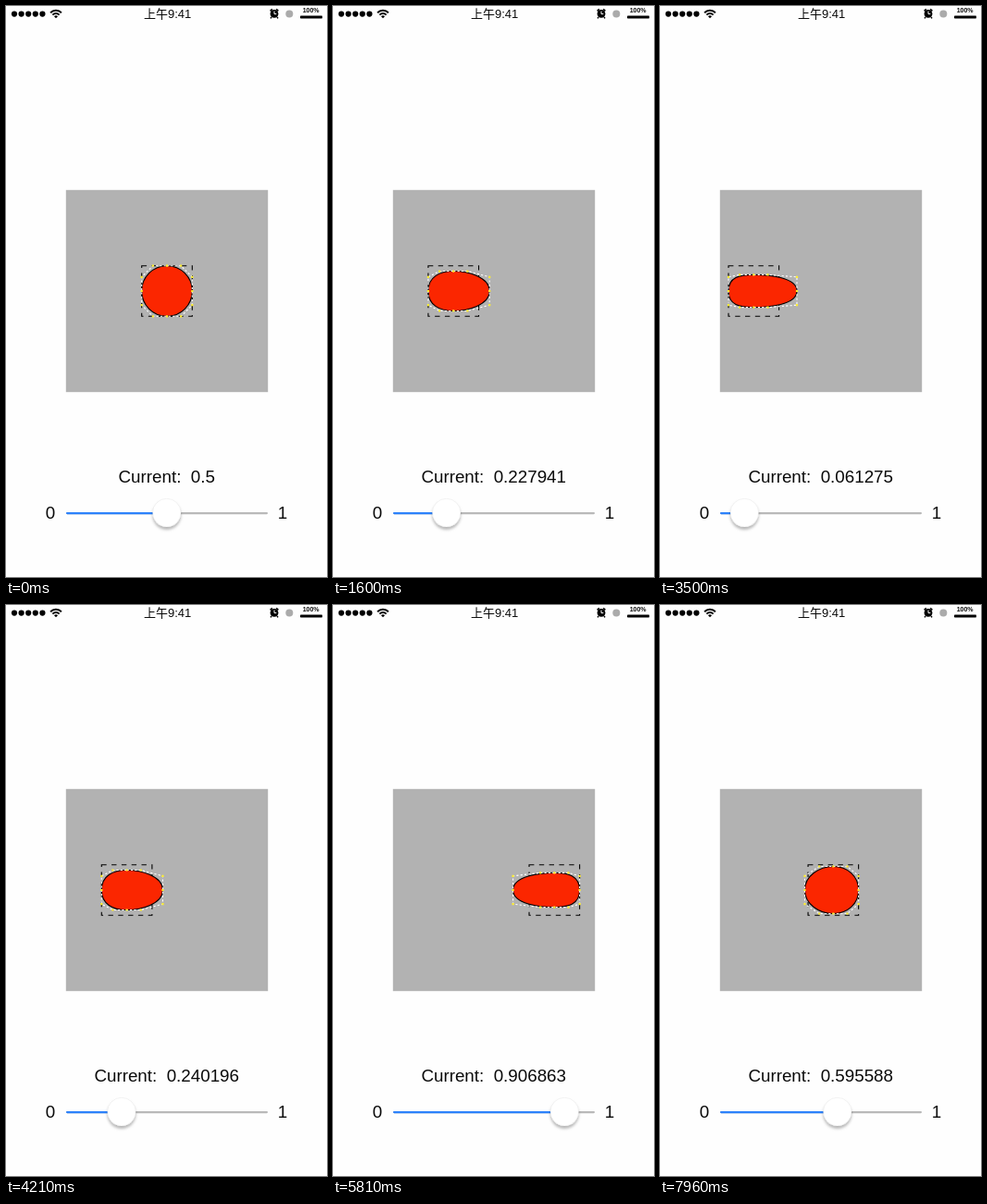
Recreate the animation shown at these times as an HTML page. Size 347 px wide and 617 px high, loop 8000 ms.

```html
<!DOCTYPE html>
<html lang="zh">
<head>
<meta charset="utf-8">
<title>Slider and elastic circle</title>
<style>
  html, body { margin: 0; width: 100%; height: 100%; overflow: hidden; background: #fefefe; }
  svg { display: block; width: 100vw; height: 100vh; }
  text { text-anchor: middle; white-space: pre; fill: #0a0a0a; }
  .label { font: 18.8px "Liberation Sans", Arial, sans-serif; }
  .clock { font: 500 13px "Liberation Sans", "Noto Sans CJK SC", "Noto Sans CJK", sans-serif; }
  .percent { font: bold 7px "Liberation Sans", Arial, sans-serif; }
</style>
</head>
<body>
<svg viewBox="0 0 347 617" xmlns="http://www.w3.org/2000/svg">
  <defs>
    <clipPath id="panel"><rect x="64.8" y="198.8" width="218.4" height="218.4"/></clipPath>
    <filter id="shadow" x="-50%" y="-50%" width="200%" height="200%">
      <feDropShadow dx="0" dy="2.8" stdDeviation="1.8" flood-color="#000" flood-opacity=".28"/>
    </filter>
  </defs>
  <rect width="347" height="617" fill="#fefefe"/>

  <g id="signal"></g>
  <g fill="none" stroke="#000" stroke-width="1.9">
    <path d="M48.1 7.2a8.4 8.4 0 0 1 11.8 0"/>
    <path d="M50.4 9.6a5 5 0 0 1 7.2 0"/>
  </g>
  <path d="M52 11.2a2.8 2.8 0 0 1 4 0l-2 2.1z"/>
  <text class="clock" x="174.6" y="13.2">上午9:41</text>
  <circle cx="290" cy="8.4" r="4.4"/>
  <path d="M285.6 5.4l2.2-2M294.4 5.4l-2.2-2M287 12l-1 1.4M293 12l1 1.4" stroke="#000" stroke-width="1.5"/>
  <path d="M290 5.6v3h2.4" fill="none" stroke="#fff" stroke-width="1"/>
  <circle cx="306.3" cy="8.6" r="4" fill="#ababab"/>
  <text class="percent" x="329.6" y="7.4">100%</text>
  <rect x="318" y="10.4" width="24" height="3.2" rx=".8"/>

  <rect x="64.8" y="198.8" width="218.4" height="218.4" fill="#b2b2b2"/>
  <g clip-path="url(#panel)">
    <path id="box" fill="none" stroke="#000" stroke-width="1.1" stroke-dasharray="5.4 5.4"/>
    <path id="blob" fill="#fb2600" stroke="#000" stroke-width="1.1"/>
    <path id="hull" fill="none" stroke="#fff" stroke-width="1.1" stroke-dasharray="2.17 2.17"/>
    <path id="dots" fill="#ffee30"/>
  </g>

  <text class="label" id="value" x="173.7" y="515.4"></text>
  <text class="label" x="48" y="554.4">0</text>
  <text class="label" x="299" y="554.4">1</text>
  <rect x="65" y="547" width="218" height="2.2" rx="1.1" fill="#b9b9b9"/>
  <rect id="fill" x="65" y="547" height="2.2" rx="1.1" fill="#2d82fb"/>
  <circle id="thumb" cy="547.6" r="15.3" fill="#fff" stroke="#000" stroke-opacity=".1" stroke-width=".5" filter="url(#shadow)"/>
</svg>
<script>
const LOOP = 8000, STEP = 90, LAG = 18;
const SIZE = 54.6, LEFT = 64.8, MID = 308, TRAVEL = 163.8;
const $ = id => document.getElementById(id);

// Drag position over time: [ms, value]
const keys = [
  [0, .5], [410, .5], [1600, .227941], [2130, .065], [2460, 0],
  [3050, 0], [3850, .15], [4210, .240196], [4740, .425], [5550, .735],
  [5810, .906863], [6130, 1], [6440, 1], [7150, .639706], [7240, .602],
  [7600, .465], [7870, .53], [7960, .595588]
];
const slopes = keys.slice(1).map((k, i) => (k[1] - keys[i][1]) / (k[0] - keys[i][0]));
const tangents = keys.map((k, i) => {
  if (i === 0) return slopes[0];
  if (i === slopes.length) return slopes[i - 1];
  const a = slopes[i - 1], b = slopes[i];
  return a * b > 0 ? 2 * a * b / (a + b) : 0;
});

function valueAt(t) {
  let i = 0;
  while (i < slopes.length - 1 && t >= keys[i + 1][0]) i++;
  const [t0, v0] = keys[i], [t1, v1] = keys[i + 1];
  const h = t1 - t0, u = Math.min(1, Math.max(0, (t - t0) / h)), w = 1 - u;
  return v0 * w * w * (1 + 2 * u) + tangents[i] * h * u * w * w
       + v1 * u * u * (3 - 2 * u) - tangents[i + 1] * h * u * u * w;
}

// Moments at which the screen refreshes
const ticks = [0];
for (const [from, to] of [[500, 1240], [1330, 2130], [2220, 2490], [3120, 3850], [3940, 4740],
  [4830, 5550], [5640, 5640], [5720, 6160], [6520, 7240], [7330, 7960]]) {
  for (let t = from; t < to - STEP / 2; t += STEP) ticks.push(t);
  ticks.push(to);
}

const line = pts => "M" + pts.map(p => p.map(n => n.toFixed(2)).join(" ")).join("L") + "Z";

function drawBlob(p) {
  const x = LEFT + TRAVEL * p, r = SIZE / 2, cx = x + r, off = SIZE / 3.6;
  const squeeze = SIZE * .2 * Math.abs(p - .5) * 2;
  const top = MID - r + squeeze, bottom = MID + r - squeeze;
  const right = x + SIZE + (p <= .5 ? squeeze * 2 : 0);
  const left = x - (p > .5 ? squeeze * 2 : 0);
  const pts = [
    [cx, top], [cx + off, top], [right, MID - off],
    [right, MID], [right, MID + off], [cx + off, bottom],
    [cx, bottom], [cx - off, bottom], [left, MID + off],
    [left, MID], [left, MID - off], [cx - off, top]
  ];
  const curves = [0, 3, 6, 9].map(i => "C" + [1, 2, 3].map(k => pts[(i + k) % 12]).join(" "));
  $("blob").setAttribute("d", "M" + pts[0] + curves.join("") + "Z");
  $("hull").setAttribute("d", line(pts));
  $("dots").setAttribute("d", pts.map(([a, b]) => `M${a - 1.1} ${b - 1.1}h2.2v2.2h-2.2z`).join(""));
  $("box").setAttribute("d", line([[x, MID - r], [x + SIZE, MID - r], [x + SIZE, MID + r], [x, MID + r]]));
}

function render(t) {
  const tick = ticks.findLast(s => s <= t);
  const v = Math.round(valueAt(tick) * 408) / 408;
  const x = 79.8 + 188 * v;
  drawBlob(valueAt(tick - LAG));
  $("thumb").setAttribute("cx", x);
  $("fill").setAttribute("width", x - 65);
  $("value").textContent = "Current:\u00a0 " + (tick ? v.toFixed(6) : "0.5");
}

for (let i = 0; i < 5; i++) {
  $("signal").innerHTML += `<circle cx="${9 + i * 7.6}" cy="8.6" r="3.1"/>`;
}

const start = performance.now();
function loop() {
  render((performance.now() - start) % LOOP);
  requestAnimationFrame(loop);
}
loop();
</script>
</body>
</html>
```
